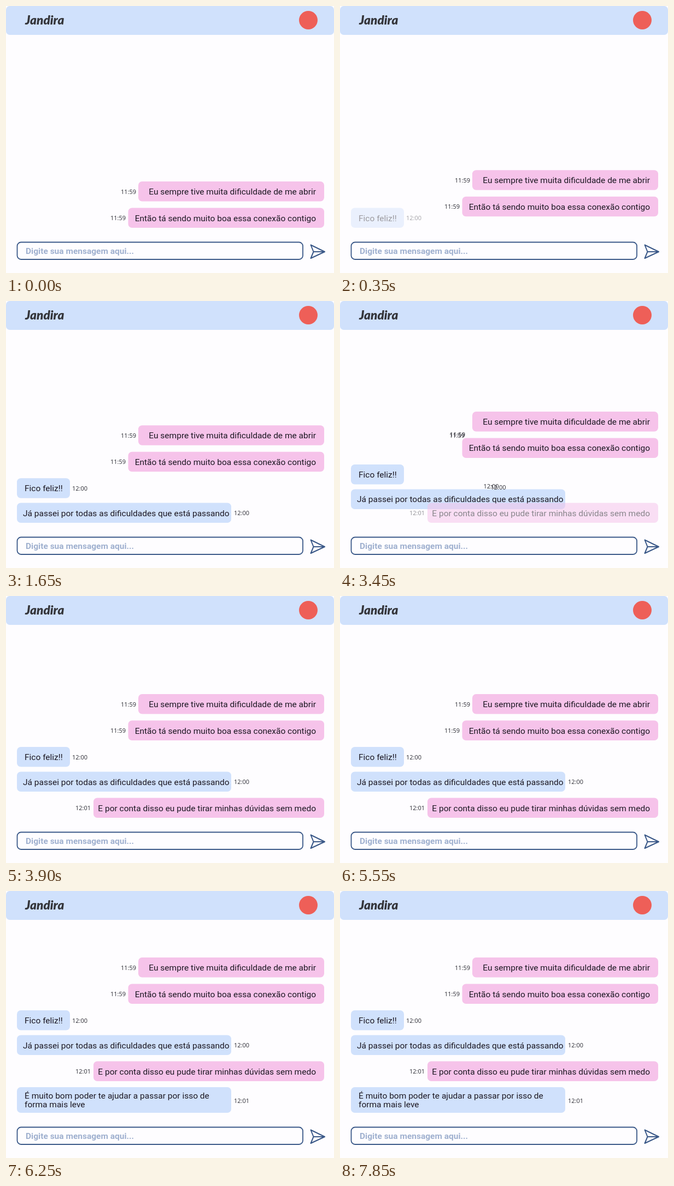
Write an HTML page that moves like this. It is 600 by 490 pixels and loops after 8 s.

```html
<!DOCTYPE html>
<html lang="pt">
<head>
<meta charset="utf-8">
<title>Chat</title>
<style>
  html, body { margin: 0; width: 100%; height: 100%; overflow: hidden; background: #fefdff; }
  svg { display: block; width: 100%; height: 100%; }
  .msg { font: 15.5px Roboto, sans-serif; fill: #1c1822; }
  .stamp { font: 11px "Open Sans", sans-serif; fill: #2b2b33; text-anchor: middle; }
  .hint { font: bold 15.5px Roboto, sans-serif; fill: #9fb0cf; }
  .name { font: italic 900 22.5px Lato, sans-serif; fill: #35363b; }
  .line { fill: none; stroke: #3a5888; stroke-width: 2; stroke-linejoin: round; }
</style>
</head>
<body>
<svg viewBox="0 0 600 490">
  <rect width="600" height="490" fill="#fefdff"/>
  <g id="bubbles"></g>
  <g id="stamps"></g>
  <rect width="600" height="53" rx="7" fill="#d0e1fc"/>
  <text class="name" x="35" y="34">Jandira</text>
  <circle cx="553" cy="26" r="17" fill="#ee5f58"/>
  <rect class="line" x="20.5" y="433.5" width="522.5" height="31.5" rx="7" style="stroke-width:1.8"/>
  <text class="hint" x="36" y="455">Digite sua mensagem aqui...</text>
  <path class="line" d="M557.5 438.5 L583 451 L557.5 463 L562.5 451 Z M562.5 451 H583"/>
</svg>
<script>
const LOOP = 8000, DURATION = 300;
const STARTS = [265, 1365, 3343, 5750];
const SCROLL = [0, -48.5, -94, -142, -200];
const PINK = '#f6c3ea', BLUE = '#d0e1fc';
const SWAP = [1, 0, 3, 2];   // stamps trade places on the third step

// y is the top of the bubble before any scrolling; born is the step that shows it
const messages = [
  { y: 322, x: 242, w: 340, born: 0, time: '11:59', tx: 224, lines: ['Eu sempre tive muita dificuldade de me abrir'] },
  { y: 370.5, x: 223.5, w: 358.5, born: 0, time: '11:59', tx: 205, lines: ['Então tá sendo muito boa essa conexão contigo'] },
  { y: 419, x: 20, w: 97, born: 1, time: '12:00', tx: 135, left: 34, lines: ['Fico feliz!!'] },
  { y: 464.5, x: 20, w: 392, born: 2, time: '12:00', tx: 431, left: 31, lines: ['Já passei por todas as dificuldades que está passando'] },
  { y: 512.5, x: 160, w: 422, born: 3, time: '12:01', tx: 141, lines: ['E por conta disso eu pude tirar minhas dúvidas sem medo'] },
  { y: 560, x: 20, w: 392, born: 4, time: '12:01', tx: 431, left: 34, lines: ['É muito bom poder te ajudar a passar por isso de', 'forma mais leve'] }
];

function add(parent, tag, attrs, text) {
  const el = document.createElementNS('http://www.w3.org/2000/svg', tag);
  for (const key in attrs) el.setAttribute(key, attrs[key]);
  if (text) el.textContent = text;
  return parent.appendChild(el);
}

function build(m) {
  const tall = m.lines.length > 1;
  m.bubble = add(document.getElementById('bubbles'), 'g', {});
  add(m.bubble, 'rect', { x: m.x, width: m.w, height: tall ? 47 : 36.5, rx: 7, fill: m.left ? BLUE : PINK });
  m.lines.forEach((line, i) => add(m.bubble, 'text', {
    class: 'msg',
    x: m.left || 567,
    y: (tall ? 21 : 24) + i * 15.5,
    'text-anchor': m.left ? 'start' : 'end'
  }, line));
  m.ty = m.y + (tall ? 28.5 : 22.5);
  m.stamp = add(document.getElementById('stamps'), 'text', { class: 'stamp' }, m.time);
}

const mix = (a, b, p) => a + (b - a) * p;

// cubic-bezier(0, 0, .58, 1)
function easeOut(x) {
  if (x <= 0) return 0;
  if (x >= 1) return 1;
  let lo = 0, hi = 1;
  for (let i = 0; i < 24; i++) {
    const u = (lo + hi) / 2;
    if (1.74 * u * u - 0.74 * u ** 3 < x) lo = u; else hi = u;
  }
  return 3 * lo * lo - 2 * lo ** 3;
}

function render(t) {
  const steps = STARTS.map(s => easeOut((t - s) / DURATION));
  const scroll = steps.reduce((y, p, i) => y + (SCROLL[i + 1] - SCROLL[i]) * p, 0);
  const swap = steps[2] < 1 ? steps[2] : 0;

  messages.forEach((m, i) => {
    const shift = Math.min(scroll, SCROLL[m.born]);
    const opacity = m.born ? steps[m.born - 1] : 1;
    m.bubble.setAttribute('transform', `translate(0 ${m.y + shift})`);
    m.bubble.setAttribute('opacity', opacity);

    let x = m.tx, y = m.ty + shift;
    if (swap && i < SWAP.length) {
      const other = messages[SWAP[i]];
      x = mix(m.tx, other.tx, swap);
      y = mix(m.ty + SCROLL[2], other.ty + SCROLL[3], swap);
    }
    m.stamp.setAttribute('x', x);
    m.stamp.setAttribute('y', y);
    m.stamp.setAttribute('opacity', opacity);
  });
}

messages.forEach(build);
const begin = performance.now();
function tick() {
  render((performance.now() - begin) % LOOP);
  requestAnimationFrame(tick);
}
render(0);
requestAnimationFrame(tick);
</script>
</body>
</html>
```
